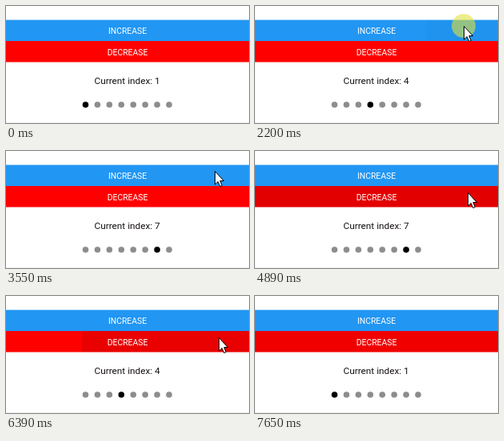
Recreate the animation shown at these times as an HTML page with a canvas. Size 304x147 px, loop 7950 ms.

```html
<!DOCTYPE html>
<html lang="en">
<head>
<meta charset="utf-8">
<title>Page indicator</title>
<style>
  html, body { margin: 0; width: 100%; height: 100%; overflow: hidden; background: #fff; }
  canvas { display: block; width: 304px; height: 147px; }
</style>
</head>
<body>
<canvas id="stage"></canvas>
<script>
const W = 304, H = 147, LOOP = 7950, LAST_CHANGE = 7650;
const PAGES = 8, TAPS = PAGES - 1, BUTTON_H = 26.5;
const SPOT = 120, RELEASE = 230, FADE = 120, GLIDE = 190;
const RIPPLE = { delay: 52, time: 197, radius: 270, alpha: 0.11 };

const canvas = document.getElementById('stage');
const ctx = canvas.getContext('2d');
const ratio = window.devicePixelRatio || 1;
canvas.width = W * ratio;
canvas.height = H * ratio;

const increase = {
  label: 'INCREASE', color: '#2196f3', top: 17.5, x: 261, y: 25,
  start: 660, period: 490, hold: 320, enter: 290, leave: 3880, drift: 27
};
const decrease = {
  label: 'DECREASE', color: '#ff0000', top: 44, x: 266, y: 52,
  start: 4560, period: 425, hold: 480, enter: 4120, leave: LAST_CHANGE, drift: 8
};
const buttons = [increase, decrease];

const clamp = (v, max = 1) => Math.max(0, Math.min(max, v));
const easeOut = v => 1 - (1 - v) ** 2;

// Number of taps begun by time t
const tapCount = (b, t) => clamp(Math.floor((t - b.start) / b.period) + 1, TAPS);

// Time since the latest tap
function sinceTap(b, t) {
  const n = tapCount(b, t);
  return n ? t - b.start - (n - 1) * b.period : Infinity;
}

function disc(x, y, r, color) {
  ctx.fillStyle = color;
  ctx.beginPath();
  ctx.arc(x, y, r, 0, Math.PI * 2);
  ctx.fill();
}

function text(str, x, y, size, color) {
  ctx.font = size + 'px Roboto, sans-serif';
  ctx.fillStyle = color;
  ctx.textAlign = 'center';
  ctx.fillText(str, x, y);
}

function drawButton(b, t) {
  ctx.save();
  ctx.beginPath();
  ctx.rect(0, b.top, W, BUTTON_H);
  ctx.fillStyle = b.color;
  ctx.fill();
  ctx.clip();
  const age = sinceTap(b, t);
  const grow = clamp((age - RIPPLE.delay) / RIPPLE.time);
  const fade = 1 - clamp((age - b.hold) / FADE);
  const alpha = RIPPLE.alpha * clamp(grow * 2) * fade;
  if (alpha > 0) {
    disc(b.x + 2, b.y + 2, RIPPLE.radius * easeOut(grow), `rgba(0,0,0,${alpha})`);
  }
  ctx.restore();
  text(b.label, 152, b.top + 17.5, 10.4, '#fff');
}

function drawCursor(b, t) {
  if (t < b.enter || t >= Math.min(b.leave + GLIDE, LAST_CHANGE)) return;
  const away = 1 - clamp((t - b.enter) / GLIDE) + clamp((t - b.leave) / GLIDE);
  ctx.save();
  ctx.translate(b.x + 0.5 + b.drift * away, b.y + 0.5 + 105 * away);
  ctx.fillStyle = '#fff';
  ctx.strokeStyle = '#000';
  const arrow = new Path2D('M0 0V16.5L3.7 13L6.3 19L8.8 18L6.3 12H11Z');
  ctx.fill(arrow);
  ctx.stroke(arrow);
  ctx.restore();
}

function draw(time) {
  const t = Math.min(time % LOOP, LAST_CHANGE);
  ctx.setTransform(ratio, 0, 0, ratio, 0, 0);
  ctx.fillStyle = '#fff';
  ctx.fillRect(0, 0, W, H);
  ctx.fillStyle = '#f3f3f3';
  ctx.fillRect(0, 146, W, 1);

  buttons.forEach(b => drawButton(b, t));

  const index = 1 + tapCount(increase, t - RELEASE) - tapCount(decrease, t - RELEASE);
  text('Current index: ' + index, 151.6, 98, 11.8, '#151010');
  for (let i = 0; i < PAGES; i++) {
    disc(99.5 + i * 14.93, 124, 3.8, i + 1 === index ? '#000' : '#8e8c8d');
  }

  for (const b of buttons) {
    if (sinceTap(b, t) < SPOT) disc(b.x, b.y, 15, 'rgba(225,225,60,0.6)');
    drawCursor(b, t);
  }
}

const start = performance.now();
function tick() {
  draw(performance.now() - start);
  requestAnimationFrame(tick);
}
tick();
</script>
</body>
</html>
```
